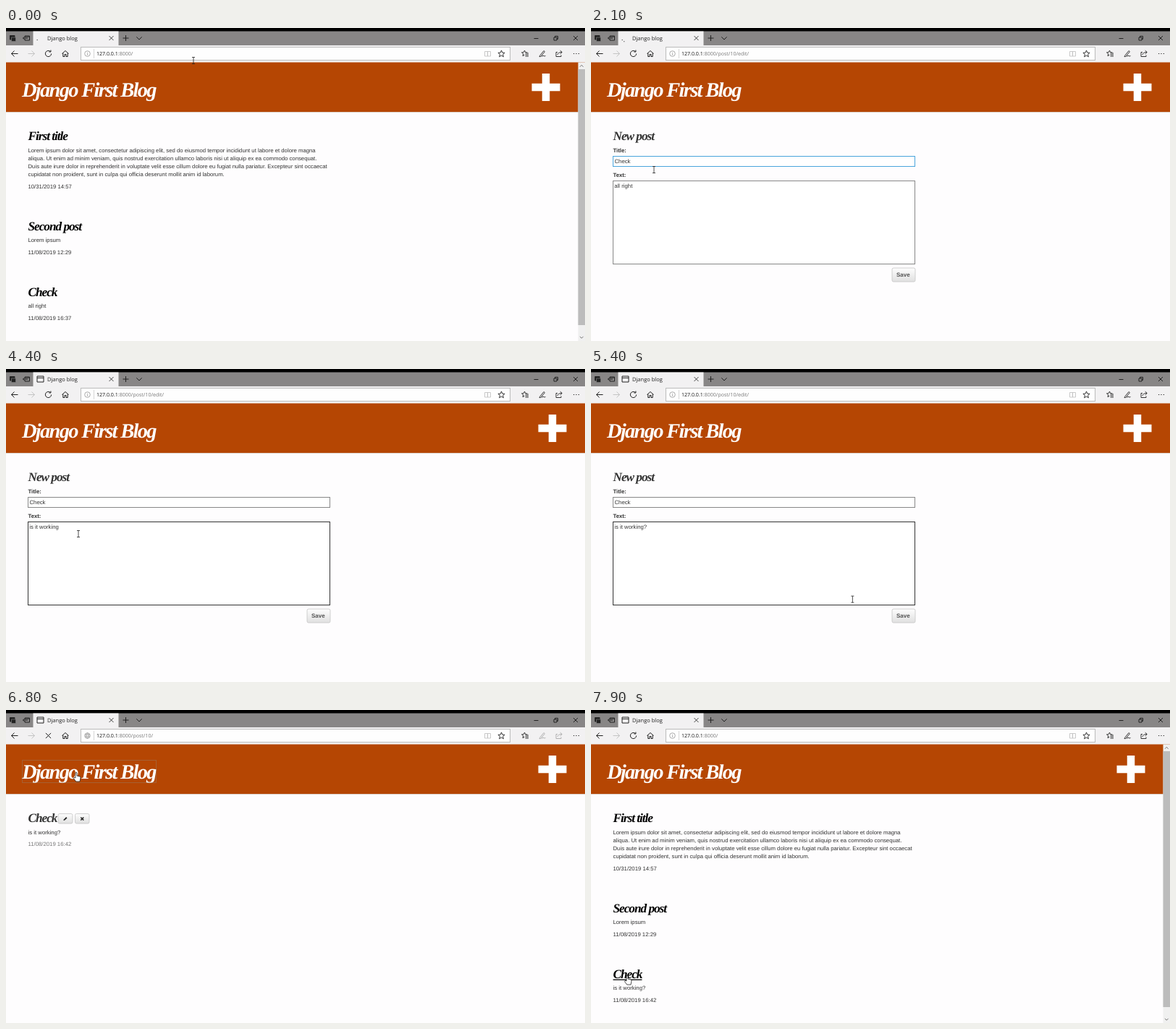
Write an HTML page with a canvas that moves like this. It is 800 by 433 pixels and loops after 8000 ms.

```html
<!DOCTYPE html>
<html lang="en">
<head>
<meta charset="utf-8">
<title>Django blog</title>
<style>
html, body { margin: 0; width: 100%; height: 100%; overflow: hidden; background: #fefdfe; }
canvas { display: block; width: 800px; height: 433px; }
</style>
</head>
<body>
<canvas></canvas>
<script>
const LOOP = 8000, STEP = 100;
const canvas = document.querySelector('canvas'), c = canvas.getContext('2d');
const dpr = window.devicePixelRatio || 1;
canvas.width = 800 * dpr;
canvas.height = 433 * dpr;
c.scale(dpr, dpr);
c.textRendering = 'geometricPrecision';

const SANS = '"Liberation Sans", Arial, sans-serif';
const UI = '"Open Sans", "Noto Sans", sans-serif';
const SCRIPT = '"Liberation Serif", serif';

const LOREM = [
  'Lorem ipsum dolor sit amet, consectetur adipiscing elit, sed do eiusmod tempor incididunt ut labore et dolore magna',
  'aliqua. Ut enim ad minim veniam, quis nostrud exercitation ullamco laboris nisi ut aliquip ex ea commodo consequat.',
  'Duis aute irure dolor in reprehenderit in voluptate velit esse cillum dolore eu fugiat nulla pariatur. Excepteur sint occaecat',
  'cupidatat non proident, sunt in culpa qui officia deserunt mollit anim id laborum.'
];

// Pointer stops: time, x, y
const STOPS = [
  [0, 259, 45], [100, 259, 45], [900, 47, 362], [1400, 47, 362], [1800, 80, 148],
  [1900, 80, 148], [2100, 87, 196], [2600, 100, 228], [4900, 100, 228], [5600, 426, 341],
  [6050, 426, 341], [6700, 97, 86], [6900, 97, 86], [7600, 99, 378], [7900, 50, 367]
];

const STAR = 'M0-4.6L1.3-1.4 4.6-1.2 2.1 1 2.9 4.3 0 2.5-2.9 4.3-2.1 1-4.6-1.2-1.3-1.4Z';
const CROSS = 'M-3-3L3 3M3-3L-3 3';
const ARROW = 'M-4.5 0H4.5M-4.5 0L-.5-4M-4.5 0L-.5 4';
const CURSORS = {
  arrow: 'M0 0V10L2.2 8 3.8 11.3 5.3 10.6 3.8 7.4H6.6Z',
  hand: 'M-1 8V1Q0-.8 1 1V5L5 6Q6.3 6.4 6 8L5 13H-.2L-3.6 8.6Q-3.4 7-1.8 7.6Z',
  beam: 'M-2-4.5H2M0-4.5V4.5M-2 4.5H2'
};

const between = (t, a, b) => t >= a && t < b;

function rect(x, y, w, h, fill, stroke) {
  if (fill) { c.fillStyle = fill; c.fillRect(x, y, w, h); }
  if (stroke) { c.strokeStyle = stroke; c.lineWidth = 1; c.strokeRect(x, y, w, h); }
}

function text(s, x, y, size, color = '#333', family = SANS, style = '', spacing = 0) {
  c.font = `${style} ${size}px ${family}`;
  c.letterSpacing = spacing + 'px';
  c.fillStyle = color;
  c.fillText(s, x, y);
  return c.measureText(s).width;
}

const body = (s, y, color, x = 30.5, style) => text(s, x, y, 7.76, color, SANS, style);
const script = (s, x, y, size, color) =>
  text(s, x, y, size, color, SCRIPT, 'italic bold', -0.06 * size);

function icon(x, y, d, stroke = '#222', width = 1, fill) {
  const p = new Path2D(d);
  c.save();
  c.translate(x, y);
  if (fill) { c.fillStyle = fill; c.fill(p); }
  if (stroke) { c.strokeStyle = stroke; c.lineWidth = width; c.stroke(p); }
  c.restore();
}

function button(x, y, w, h, dark) {
  const g = c.createLinearGradient(0, y, 0, y + h);
  g.addColorStop(0, dark ? '#ececec' : '#fdfdfd');
  g.addColorStop(1, dark ? '#d8d8d8' : '#e0e0e0');
  c.beginPath();
  c.roundRect(x, y, w, h, 2);
  c.fillStyle = g;
  c.fill();
  c.strokeStyle = '#c6c6c6';
  c.lineWidth = 0.8;
  c.stroke();
}

function dotted(x, y, w, h, color) {
  c.setLineDash([1, 1]);
  rect(x, y, w, h, null, color);
  c.setLineDash([]);
}

function spinner(age) {
  const count = Math.min(5, 1 + Math.floor(age / 100));
  c.fillStyle = '#444';
  for (let i = 0; i < count; i++) {
    const a = (150 - 40 * i + Math.max(0, age - 100) * 0.36) * Math.PI / 180;
    c.beginPath();
    c.arc(47.5 + 5 * Math.cos(a), 14 + 5 * Math.sin(a), 0.65, 0, 7);
    c.fill();
  }
}

function browser(t, path, pending) {
  rect(0, 0, 800, 48, '#f2f1f2');
  rect(0, 4, 800, 20, '#888686');
  rect(0, 0, 800, 4.5, '#000');
  rect(37.5, 4.5, 118, 20, '#f2f1f2');
  icon(9, 14, 'M-3.5-3.5H3V2H-3.5Z', '#222', 1, '#222');
  icon(10.5, 15.5, 'M-3-2.5H3V3H-3Z', '#888', .6, '#222');
  icon(28, 14, 'M-2-1V-3H4.5V3H-2V1M2 0H-4.5M-2.8-1.7L-4.5 0-2.8 1.7M-2-2H4.5');

  const start = [[0, 500], [2000, 2500], [5800, 6300], [7200, 7650]].find(s => between(t, ...s));
  if (start) spinner(t - start[0]);
  else icon(47.5, 14, 'M-4.5-4H4.5V4H-4.5ZM-4.5-1.7H4.5');
  text('Django blog', 57, 16.8, 7.5, '#222', UI);
  icon(145.5, 14, CROSS, '#333', .9);
  icon(165.5, 14, 'M-4 0H4M0-4V4');
  icon(184, 14, 'M-3.7-1.7L0 2 3.7-1.7');
  icon(732.5, 14, 'M-3 .5H3');
  icon(759.5, 14, 'M-2.5-1H1.5V3H-2.5ZM-1-1V-2.7H3V1.4H1.5');
  icon(787, 14, CROSS);

  icon(12, 35.5, ARROW);
  c.save();
  c.translate(35, 35.5);
  c.scale(-1, 1);
  icon(0, 0, ARROW, '#c4c4c4');
  c.restore();
  if (pending) icon(58.5, 35.5, 'M-3.6-3.6L3.6 3.6M3.6-3.6L-3.6 3.6');
  else icon(58.5, 35.5, 'M3-2.8A4.1 4.1 0 1 0 4.1 0M3.4-5V-2.5H.8');
  icon(82, 35.5, 'M-4.5 0L0-4 4.5 0M-3.2-1V4H-1V1H1V4H3.2V-1');

  rect(103.5, 26.5, 593, 18, '#fefefe', '#bbb');
  icon(112.5, 35.5, 'M-3.8 0A3.8 3.8 0 1 1 3.8 0A3.8 3.8 0 1 1-3.8 0' +
    (pending ? 'M-3.5-1.3H3.5M-3.5 1.3H3.5M0-3.8Q-3.4 0 0 3.8Q3.4 0 0-3.8' : 'M0-.7V2M0-2V-1.3'), '#888', .7);
  rect(121, 29, .8, 13, '#ccc');
  const w = text('127.0.0.1', 125, 38.2, 7.05, '#111', UI);
  text(':8000' + path, 125 + w, 38.2, 7.05, '#777', UI);

  icon(665.5, 35.5, 'M-4-3H0V3.5H-4ZM0-3H4V3.5H0Z', '#bbb', .8);
  icon(684.5, 35.5, STAR, '#222', .9);
  icon(717, 35, 'M-.5-4L.6-1.4 3.4-1.1M-.5-4L-1.7-1.4-4.5-1.1-2.3.7-3 3.7-.6 2.2M.5 0H5M.5 2H5M.5 4H5', '#222', .9);
  const tool = pending ? '#aaa' : '#222';
  icon(741, 35.5, 'M-3.6 3L2-4 3.4-2.8-2 3.8-4 4.2ZM-1 4Q1 2 2 3T4.5 3', tool, .9);
  icon(764, 35.5, 'M-2-2H-4V4H3V2M-2 1.5Q-1.5-2 4-2M1.7-4.4L4.3-2 1.7 .4', tool, .9);
  icon(788, 35.5, 'M-4 0H-2.8M-.6 0H.6M2.8 0H4', '#222', 1.2);
}

function header(plusX, fallback) {
  rect(0, 47.5, 800, 68.5, '#b54603');
  rect(0, 116, 800, 1, '#dcd0c8');
  if (fallback) {
    text('Django First Blog', 23, 96, 27.4, '#fff', UI);
    icon(766, 81, 'M-11 0H11M0-11V11', '#fff', 1.8);
  } else {
    script('Django First Blog', 22, 95, 28.5, '#fff');
    icon(plusX, 82, 'M-19.5 0H19.5M0-19V19', '#fff', 10.5);
  }
}

function listPage(t, hover, pending) {
  const edited = t > 4000;
  header(746, false);
  script('First title', 30.5, 154.5, 17.3, '#000');
  LOREM.forEach((line, i) => body(line, 171.8 + 11.2 * i));
  body('10/31/2019 14:57', 221.8);
  script('Second post', 30.5, 279.5, 17.3, '#000');
  body('Lorem ipsum', 296.2);
  body('11/08/2019 12:29', 313);
  const w = script('Check', 30.5, 371, 17.3, '#000');
  if (hover) rect(30.5, 372.5, w, 1.3, '#000');
  if (pending) dotted(31.5, 355.5, w - 1, 18.5, '#777');
  body(edited ? 'is it working?' : 'all right', 387.3);
  body(edited ? '11/08/2019 16:42' : '11/08/2019 16:37', 404);

  rect(790.5, 47.5, 9.5, 386, '#f0f0f0');
  rect(790.5, 57, 9.5, 354, '#bcbcbc');
  icon(795.3, 52.5, 'M-2.3 1.2L0-1.2 2.3 1.2', '#666', .9);
  icon(795.3, 428, 'M-2.3-1.2L0 1.2 2.3-1.2', '#666', .9);
}

function postPage(t, pending) {
  const edited = t > 4000, fallback = between(t, 5900, 6000);
  header(755, fallback);
  if (fallback) {
    text('Check', 30.5, 155.5, 16.6, '#333', UI);
    button(82.5, 144.5, 21.5, 13.5);
    button(109, 144.5, 20.5, 13.5);
    icon(93.5, 151, 'M-3.2 3L-2.4 .8 2-3 3.4-1.6-1 2.3Z', '#6b5030', .6, '#c08a45');
  } else {
    script('Check', 30.5, 154.5, 17.3, '#333');
    button(72, 143.5, 20, 13.5);
    button(95.5, 143.5, 19.5, 13.5);
    icon(82, 150.5, 'M-2.6 2.6L-2 .8 1.2-2.4 2.5-1.1-.8 2Z', null, 0, '#222');
    icon(105.3, 150.5, 'M-2-2L2 2M2-2L-2 2', '#222', 1.5);
    if (pending && edited) dotted(22.5, 69.5, 185, 31, '#997a62');
  }
  body(edited ? 'is it working?' : 'all right', 171.8);
  body(edited ? '11/08/2019 16:42' : '11/08/2019 16:37', 188.3, '#777');
}

function typed(t) {
  if (t < 3000) return 'all right';
  if (t < 3500) return 'all right'.slice(0, Math.max(0, 8 - Math.floor((t - 3000) / 50)));
  return t < 4700 ? 'is it working'.slice(0, Math.floor((t - 3500) / 68)) : 'is it working?';
}

function editPage(t, x, y) {
  header(755, false);
  script('New post', 30.5, 154.5, 17.3, '#333');
  body('Title:', 171.8, '#333', 30.5, 'bold');
  rect(30.5, 177.5, 417, 14, '#fff', t < 2600 ? '#4aa5dc' : '#888');
  body('Check', 187.2, '#333', 32.5);
  body('Text:', 205.8, '#333', 30.5, 'bold');
  rect(30.5, 211.5, 417, 115, '#fff', between(t, 2600, 5700) ? '#333' : '#888');
  body(typed(t), 221.2, '#333', 32.3);
  button(416, 332, 32, 19, x > 416 && y > 332);
  text('Save', 422, 344.2, 8, '#555', SANS, 'bold');
}

function pointer(t) {
  const i = STOPS.findIndex(s => s[0] > t);
  if (i < 0) return STOPS.at(-1).slice(1);
  const [t0, x0, y0] = STOPS[i - 1], [t1, x1, y1] = STOPS[i];
  const p = (t - t0) / (t1 - t0), e = p * p * (3 - 2 * p);
  return [x0 + (x1 - x0) * e, y0 + (y1 - y0) * e];
}

function cursorKind(page, x, y) {
  const inside = (l, top, r, b) => x >= l && x <= r && y >= top && y <= b;
  if (inside(104, 27, 697, 46)) return 'beam';
  if (inside(22, 69, 208, 101)) return 'hand';
  if (page === 'list') {
    if (inside(30, 357, 69, 376)) return 'hand';
    if (inside(30, 165, 447, 207)) return 'beam';
  }
  if (page === 'post' && inside(72, 143, 115, 157)) return 'hand';
  if (page === 'edit' && inside(30, 165, 448, 326)) return 'beam';
  return 'arrow';
}

function draw(t) {
  const page = t < 1400 || t >= 7200 ? 'list' : between(t, 2000, 5900) ? 'edit' : 'post';
  const pending = between(t, 900, 1400) || between(t, 1900, 2000) || between(t, 6800, 7200);
  const [x, y] = pointer(t), kind = cursorKind(page, x, y);
  rect(0, 0, 800, 433, '#fefdfe');
  browser(t, { list: '/', post: '/post/10/', edit: '/post/10/edit/' }[page], pending);
  if (page === 'list') listPage(t, kind === 'hand' && y > 300, pending);
  else if (page === 'post') postPage(t, pending);
  else editPage(t, x, y);
  icon(x, y, CURSORS[kind], '#222', .8, kind === 'beam' ? null : '#fff');
}

function tick(now) {
  draw(Math.floor(now % LOOP / STEP) * STEP);
  requestAnimationFrame(tick);
}
requestAnimationFrame(tick);
</script>
</body>
</html>
```
